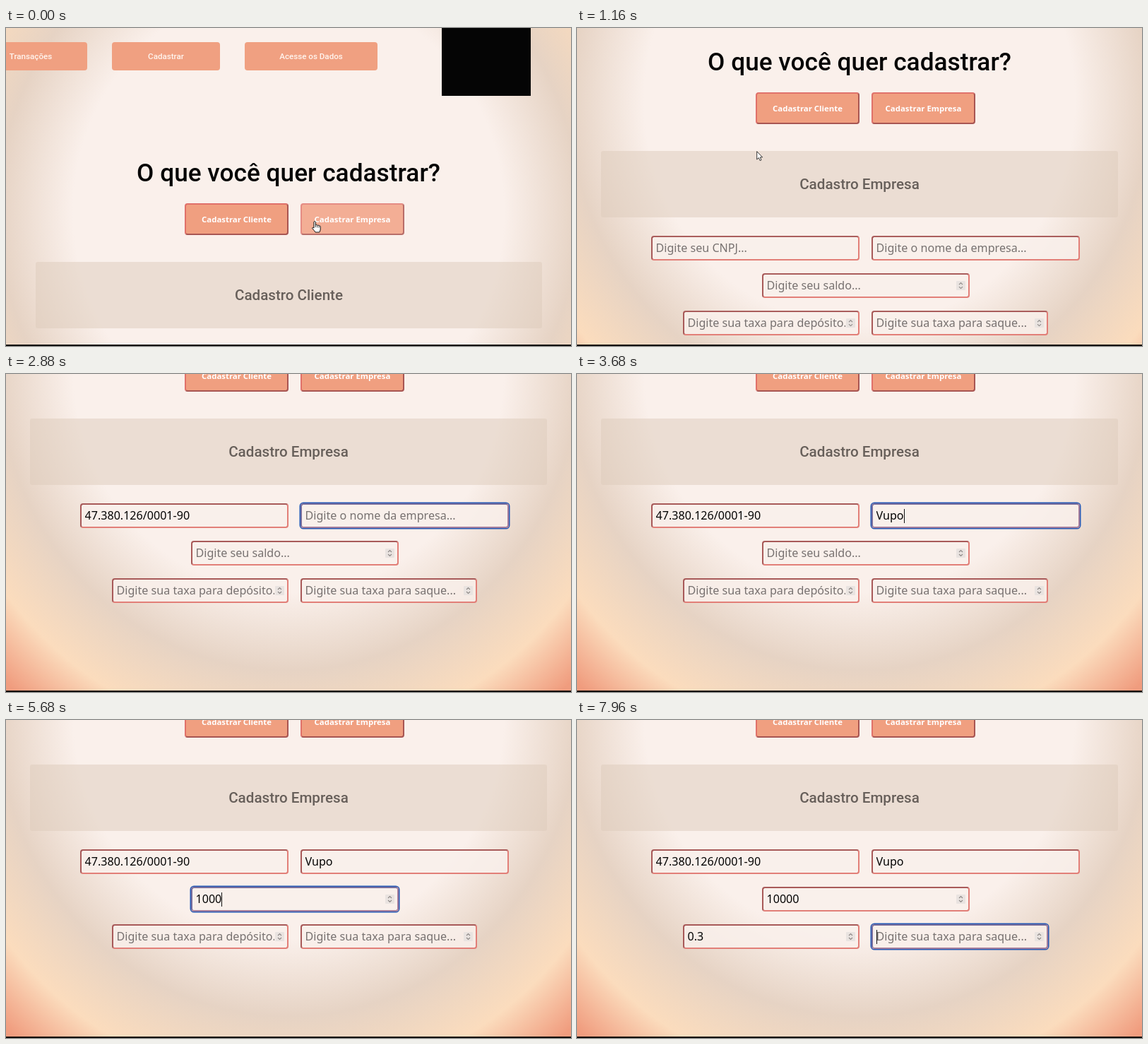
An HTML page for the animation above (8000 ms loop, 800 by 450 pixels).

```html
<!DOCTYPE html>
<html lang="pt-BR">
<head>
<meta charset="utf-8">
<title>Cadastro</title>
<style>
  html, body { margin: 0; width: 100%; height: 100%; overflow: hidden; }
  #stage { position: relative; width: 800px; height: 450px; overflow: hidden; background: #faf0eb; }
  #stage div, #stage svg { position: absolute; box-sizing: border-box; }
  #page { left: 0; top: 0; width: 800px; height: 718px; }
  #glow {
    left: -40px; top: -198px; width: 880px; height: 916px;
    background: radial-gradient(ellipse farthest-corner, #faf0eb 49%, #e6d3c4 66%, #fbdcbd 81%, #f09c7e 94%);
  }
  #mark { left: 617px; top: -30px; width: 126px; height: 126px; background: #050505; }
  .nav, .button, .title, .panel { display: flex; align-items: center; justify-content: center; white-space: nowrap; }
  .nav { background: #f0a081; border-radius: 4px; color: #fff5ef; font: 500 11.6px Roboto, sans-serif; }
  .title { color: #050505; font: 500 35.2px Roboto, sans-serif; }
  .button {
    background: #f09f80; border: 2px solid; border-color: #e0716a #a85653 #a85653 #e0716a; border-radius: 4px;
    color: #fff; font: 700 11.4px "Noto Sans", sans-serif;
  }
  .button.hover { background: #f3ae95; border-color: #e58c84 #b86e69 #b86e69 #e58c84; }
  .panel { background: rgba(222, 204, 188, .5); border-radius: 3px; color: #675f5a; font: 500 20.6px Roboto, sans-serif; }
  .field {
    height: 35px; border: 2px solid; border-color: #a85a59 #e27f78 #e27f78 #a85a59; border-radius: 4px;
    background: rgba(250, 240, 235, .85); color: #050505; font: 16.1px/31px "Noto Sans", sans-serif;
  }
  .field.focus { box-shadow: 0 0 0 1.5px #2458b5; border-color: #7a6f9c #a87f9c #a87f9c #7a6f9c; }
  .field .value { left: 4.5px; right: 4px; top: 0; height: 31px; overflow: hidden; white-space: pre; }
  .field.number .value { right: 18px; }
  .field.empty .value { color: #777170; }
  .caret { top: 6px; width: 1px; height: 20px; background: #111; }
  .spin { right: 4px; top: 9px; }
  #edge { left: 0; top: 448px; width: 800px; height: 2px; background: #000; }
</style>
</head>
<body>
<div id="stage">
  <div id="page"><div id="glow"></div><div id="mark"></div></div>
  <svg id="arrow" width="12" height="18" viewBox="0 0 12 18">
    <path d="M.7 .7V12L3.3 9.6L5.1 13.6L7 12.8L5.3 8.9H8.6Z" fill="#fff" stroke="#222" stroke-width=".9"/>
  </svg>
  <svg id="hand" width="16" height="20" viewBox="0 0 16 20">
    <path d="M4 11V2.3Q5.2 .6 6.4 2.3V7Q8 5.9 8.8 7.3Q10.3 6.5 11.1 7.9Q12.8 7.3 13.2 9V13Q12.9 15 11.8 17H6Q5 15 1.5 11.4Q1.6 9.3 4 11Z" fill="#fff" stroke="#111"/>
    <path d="M6.4 7V10M8.8 8V10.4M11.1 8.5V10.6" stroke="#111" stroke-width=".8"/>
  </svg>
  <div id="edge"></div>
</div>
<script>
const LOOP = 8000, CLICK = 240, POINTER_END = 1580, BLINK = 530;
const page = document.getElementById('page');
const arrow = document.getElementById('arrow');
const hand = document.getElementById('hand');

function add(parent, className, text = '') {
  const el = document.createElement('div');
  el.className = className;
  el.textContent = text;
  parent.append(el);
  return el;
}

function place(el, left, top, width, height) {
  Object.assign(el.style, { left: left + 'px', top: top + 'px', width: width + 'px', height: height + 'px' });
  return el;
}

const box = (className, text, ...area) => place(add(page, className, text), ...area);

box('nav', 'Transações', -45, 20, 160, 40);
box('nav', 'Cadastrar', 150, 20, 153, 40);
box('nav', 'Acesse os Dados', 338, 20, 188, 40);
box('title', 'O que você quer cadastrar?', 100, 180, 600, 50);
box('button', 'Cadastrar Cliente', 253, 248, 147, 45);
const companyButton = box('button', 'Cadastrar Empresa', 417, 248, 147, 45);
const clientPanel = box('panel', 'Cadastro Cliente', 42, 331, 717, 94);
const companyPanel = box('panel', 'Cadastro Empresa', 34, 330.5, 732, 94);

// Focus lasts from `from` to `to`; keys are the moments when characters appear.
const fields = [
  { x: 105, y: 451, w: 295, hint: 'Digite seu CNPJ...', text: '47.380.126/0001-90', from: 1600, to: 2280, keys: [2000], paste: true },
  { x: 417, y: 451, w: 295, hint: 'Digite o nome da empresa...', text: 'Vupo', from: 2280, to: 4200, keys: [3120, 3320, 3480, 3640] },
  { x: 262, y: 504, w: 294, hint: 'Digite seu saldo...', text: '10000', from: 4200, to: 6280, number: true, keys: [5000, 5240, 5400, 5560, 5720] },
  { x: 150, y: 557, w: 250, hint: 'Digite sua taxa para depósito...', text: '0.3', from: 6280, to: 7560, number: true, keys: [7080, 7240, 7360] },
  { x: 417, y: 557, w: 250, hint: 'Digite sua taxa para saque...', text: '', from: 7560, to: LOOP, number: true, keys: [] }
];

for (const f of fields) {
  f.el = box('field' + (f.number ? ' number' : ''), '', f.x, f.y, f.w, 35);
  f.value = add(f.el, 'value');
  f.caret = add(f.el, 'caret');
  if (f.number) {
    f.el.insertAdjacentHTML('beforeend',
      `<svg class="spin" width="13" height="13"><rect width="13" height="13" rx="1" fill="#e9e3e0"/>
       <path d="M4 5L6.5 2.5L9 5M4 8L6.5 10.5L9 8" fill="none" stroke="#8d8886" stroke-width="1.1"/></svg>`);
  }
}

// Linear interpolation through [time, value] points.
function track(points, t) {
  const i = points.findIndex(p => p[0] > t);
  if (i < 0) return points[points.length - 1][1];
  if (i === 0) return points[0][1];
  const [t0, a] = points[i - 1], [t1, b] = points[i];
  return a + (b - a) * (t - t0) / (t1 - t0);
}

const scrollPath = [[800, 0], [920, 49], [1160, 156.5], [1370, 250], [1420, 262], [1480, 268]];
const pointerX = [[400, 437], [920, 373], [1160, 254], [1500, 220]];
const pointerY = [[400, 273], [920, 174], [1160, 174], [1500, 200]];

function drawField(f, t) {
  const typed = f.keys.filter(k => k <= t).length;
  const text = f.paste && typed ? f.text : f.text.slice(0, typed);
  const focused = t >= f.from && t < f.to;
  const shown = text || f.hint;
  if (f.value.textContent !== shown) f.value.textContent = shown;
  f.el.classList.toggle('empty', !text);
  f.el.classList.toggle('focus', focused);

  const lastAction = Math.max(f.from, ...f.keys.filter(k => k <= t));
  const caretOn = focused && Math.floor((t - lastAction) / BLINK) % 2 === 0;
  f.caret.style.display = caretOn ? '' : 'none';
  if (caretOn) {
    const range = document.createRange();
    range.selectNodeContents(f.value);
    f.caret.style.left = 4.5 + (text ? range.getBoundingClientRect().width : 0) + 'px';
  }
}

function draw(now) {
  const t = now % LOOP;
  const company = t >= CLICK;
  page.style.transform = `translateY(${-track(scrollPath, t)}px)`;
  clientPanel.style.display = company ? 'none' : '';
  companyPanel.style.display = company ? '' : 'none';

  const x = track(pointerX, t), y = track(pointerY, t);
  const hovering = t < 900 && y > 248;
  companyButton.classList.toggle('hover', hovering);
  place(hand, x - 5, y - 1, 16, 20).style.display = hovering ? '' : 'none';
  place(arrow, x, y, 12, 18).style.display = !hovering && t < POINTER_END ? '' : 'none';

  for (const f of fields) {
    f.el.style.display = company ? '' : 'none';
    drawField(f, t);
  }
}

function frame() {
  draw(performance.now());
  requestAnimationFrame(frame);
}
frame();
</script>
</body>
</html>
```
